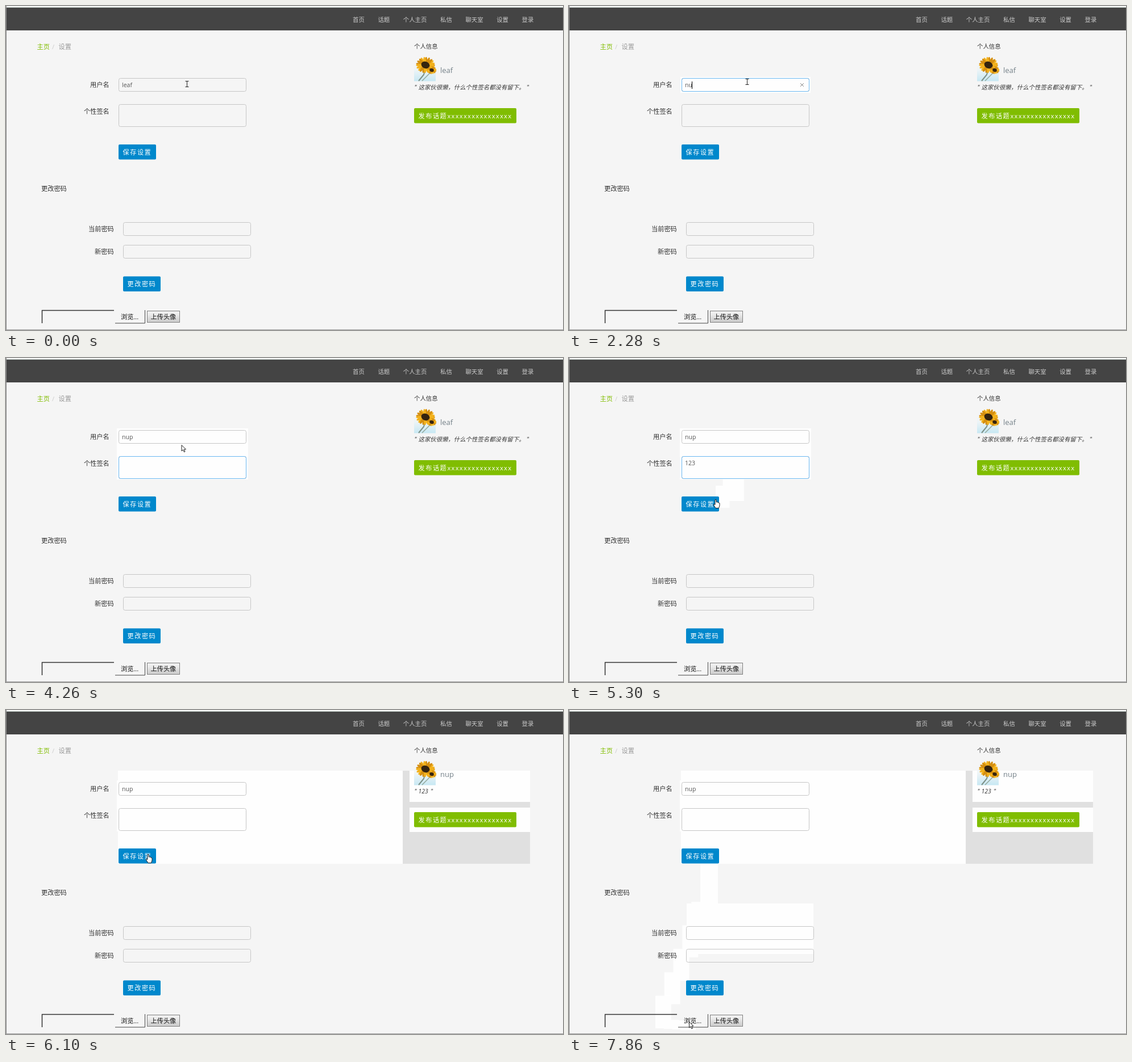
Recreate the animation shown at these times as an HTML page with a canvas. Size 980 px wide and 571 px high, loop 8000 ms.

```html
<!DOCTYPE html>
<html lang="zh-CN">
<head>
<meta charset="utf-8">
<title>设置</title>
<style>
html, body { margin: 0; width: 100%; height: 100%; overflow: hidden; background: #f5f5f5; }
canvas { display: block; width: 980px; height: 571px; }
</style>
</head>
<body>
<canvas id="stage" width="980" height="571"></canvas>
<script>
const ctx = document.getElementById('stage').getContext('2d');
const LOOP = 8000;
const FONT = '"Open Sans", "Noto Sans CJK SC", "Noto Sans CJK", "Noto Sans", sans-serif';
const OLD_NAME = 'leaf', NEW_NAME = 'nup', BIO = '123';
const WHITE = '#fefefe', INK = '#333', BLUE = '#0088cc', GREEN = '#80bd01';

// Moments of the story, in ms.
const FOCUS_NAME = 490, FOCUS_BIO = 3760, PRESS = 5600, SAVED = 6100, HOVER_PASSWORD = 7070;
const eraseKeys = [1250, 1570, 1750, 1900];
const nameKeys = [2280, 2280, 2510];
const bioKeys = [4350, 4500, 4750];

const box = (x, y, w, h) => ({ x, y, w, h });
const nameField = box(198, 127, 225, 24);
const bioField = box(198, 173, 225, 40);
const oldField = box(206, 381, 225, 24);
const newField = box(206, 421, 225, 24);
const saveButton = box(198, 244, 66, 26.5);
const fields = [nameField, bioField, oldField, newField];

// The pointer advances in even ticks along each straight move.
const START = { x: 318.5, y: 137.5 };
const moves = [
  { begin: -150, end: 270, ticks: 2, x: 313.5, y: 133.5 },
  { begin: 2990, end: 3200, ticks: 3, x: 308.5, y: 153 },
  { begin: 5030, end: 5300, ticks: 4, x: 258, y: 249, sweeps: true },
  { begin: 5300, end: 5460, ticks: 2, x: 250, y: 254 },
  { begin: 6860, end: 6930, ticks: 1, x: 231, y: 338, sweeps: true },
  { begin: 6975, end: 7450, ticks: 5, x: 152, y: 545, sweeps: true },
  { begin: 7553, end: 7860, ticks: 4, x: 211, y: 549, sweeps: true }
];

const clamp = (v, lo, hi) => Math.min(hi, Math.max(lo, v));
const ramp = (t, from, to) => clamp((t - from) / (to - from), 0, 1);
const mix = (a, b, p) => a + (b - a) * p;
const pressed = (keys, t) => keys.filter(k => k <= t).length;
const inside = (p, b) => p.x >= b.x && p.x <= b.x + b.w && p.y >= b.y && p.y <= b.y + b.h;

function pointerTrail(t) {
  const trail = [START];
  let from = START;
  for (const move of moves) {
    const done = clamp(Math.floor((t - move.begin) / (move.end - move.begin) * move.ticks + 1e-6), 0, move.ticks);
    for (let i = 1; i <= done; i++) {
      const p = i / move.ticks;
      trail.push({ x: mix(from.x, move.x, p), y: mix(from.y, move.y, p), sweeps: move.sweeps });
    }
    if (done < move.ticks) break;
    from = move;
  }
  return trail;
}

function caretAlpha(t, events) {
  const age = t - Math.max(...events.filter(e => e <= t));
  return 1 - ramp(age % 940, 400, 500);
}

function rect(x, y, w, h, color) {
  ctx.fillStyle = color;
  ctx.fillRect(x, y, w, h);
}

function text(str, x, y, size = 11.2, color = INK, spacing = 0, style = '') {
  ctx.font = `${style} ${size}px ${FONT}`;
  ctx.letterSpacing = spacing + 'px';
  ctx.fillStyle = color;
  ctx.fillText(str, x, y);
}

function line(points, color, width = 1) {
  ctx.beginPath();
  points.forEach(([x, y]) => ctx.lineTo(x, y));
  ctx.strokeStyle = color;
  ctx.lineWidth = width;
  ctx.stroke();
}

function gradient(top, bottom, ...colors) {
  const g = ctx.createLinearGradient(0, top, 0, bottom);
  colors.forEach((color, i) => g.addColorStop(i / (colors.length - 1), color));
  return g;
}

function drawField({ x, y, w, h }, focus = 0) {
  ctx.beginPath();
  ctx.roundRect(x + 0.5, y + 0.5, w - 1, h - 1, 3);
  ctx.lineWidth = 1;
  ctx.strokeStyle = '#c6c6c6';
  ctx.stroke();
  ctx.strokeStyle = `rgba(106,184,241,${focus})`;
  ctx.stroke();
}

function drawButton({ x, y, w, h }, label, color) {
  ctx.beginPath();
  ctx.roundRect(x, y, w, h, 2);
  ctx.fillStyle = color;
  ctx.fill();
  text(label, x + 7.5, y + 17.7, 11.2, '#fff', 1.5);
}

function typed(str, y, caret) {
  text(str, 204, y, 10.5, '#555');
  const x = Math.round(204 + ctx.measureText(str).width) - (str ? 1 : 0);
  rect(x, y - 10, 1, 13, `rgba(0,0,0,${caret})`);
}

function flower(x, y, r) {
  for (let i = 0; i < 22; i++) {
    const a = i * 2.4;
    ctx.beginPath();
    ctx.ellipse(x + Math.cos(a) * r * 0.65, y + Math.sin(a) * r * 0.5, r * 0.4, r * 0.14, a, 0, 7);
    ctx.fillStyle = i % 2 ? '#f3b21c' : '#d58f10';
    ctx.fill();
  }
  ctx.beginPath();
  ctx.ellipse(x, y, r * 0.48, r * 0.38, 0.4, 0, 7);
  ctx.fillStyle = '#35240f';
  ctx.fill();
}

function drawAvatar() {
  rect(718, 94, 38, 38.5, gradient(94, 132, 'rgba(245,245,245,0)', '#ecf4f7', '#c8e8f3'));
  line([[738, 110], [735, 121], [726, 132]], '#7d9187', 2);
  line([[748, 116], [741, 123], [732, 132]], '#93a99d', 1.5);
  flower(738, 104, 16);
  flower(749, 113, 8);
}

// Areas that are repainted brighter once they have been touched.
function drawRepaints(t, trail) {
  const { x, y, w, h } = nameField;
  if (t >= FOCUS_NAME) rect(x - 2, y - 2, w + 4, h + 4, WHITE);
  if (t >= FOCUS_BIO) rect(x - 3, y - 3, w + 6, bioField.y + bioField.h - y + 4, WHITE);
  if (t >= PRESS) rect(197, 213, 226, 58, WHITE);
  if (t >= SAVED) {
    rect(197, 107, 501, 164, WHITE);
    rect(698, 107, 224, 164, '#e0e0e0');
    rect(710, 107, 212, 55, WHITE);
    rect(710, 172, 212, 43, WHITE);
  }
  if (t >= HOVER_PASSWORD) rect(207, 341, 223, 89, WHITE);
  trail.forEach((p, i) => {
    if (!p.sweeps || p.y < 200) return;
    const last = trail[i - 1];
    rect(Math.min(p.x, last.x), Math.max(213, last.y), Math.abs(p.x - last.x) + 12, p.y - last.y + 15, WHITE);
  });
}

function drawHeader() {
  rect(0, 2, 980, 1, '#b9c4bf');
  rect(0, 3, 980, 40, '#444');
  let x = 610;
  for (const label of ['首页', '话题', '个人主页', '私信', '聊天室', '设置', '登录']) {
    text(label, x, 27.5, 10.4, '#ccc');
    x += label.length * 10.4 + 23.6;
  }
  text('主页', 54.5, 76, 11.2, GREEN);
  text('/', 81, 76, 11.2, '#ccc');
  text('设置', 92.5, 76, 11.2, '#999');
}

function drawProfileForm(t) {
  const erased = pressed(eraseKeys, t), added = pressed(nameKeys, t);
  const name = added ? NEW_NAME.slice(0, added) : OLD_NAME.slice(0, OLD_NAME.length - erased);
  const bio = t < SAVED ? BIO.slice(0, pressed(bioKeys, t)) : '';
  const inName = t >= FOCUS_NAME && t < FOCUS_BIO;
  const inBio = t >= FOCUS_BIO && t < PRESS;

  text('用户名', 148, 143);
  drawField(nameField, inName ? ramp(t, FOCUS_NAME - 90, 670) : 0);
  typed(name, 143, inName ? caretAlpha(t, [FOCUS_NAME, ...eraseKeys, ...nameKeys]) : 0);
  if (inName && name) {
    line([[407, 136], [413, 142]], '#888');
    line([[413, 136], [407, 142]], '#888');
  }

  text('个性签名', 137, 190);
  drawField(bioField, inBio ? ramp(t, FOCUS_BIO - 80, 3840) : 0);
  typed(bio, 189, inBio ? caretAlpha(t, [FOCUS_BIO, ...bioKeys]) : 0);

  const heat = t < SAVED ? ramp(t, 5300, PRESS) : 0;
  drawButton(saveButton, '保存设置', `rgb(0,${136 - 52 * heat},204)`);
}

function drawPasswordForm() {
  text('更改密码', 62, 326.3);
  text('当前密码', 145, 397.3);
  drawField(oldField);
  text('新密码', 156, 437.3);
  drawField(newField);
  drawButton(box(206, 476.5, 66, 26.5), '更改密码', BLUE);
}

function drawUpload() {
  line([[63.5, 559], [63.5, 536.5], [190, 536.5]], INK, 1.5);
  line([[192, 559], [244.5, 559], [244.5, 536]], '#444');
  text('浏览...', 202, 552.3, 11.2, '#111');
  rect(248, 537, 58, 21, gradient(537, 558, '#f2f2f2', '#ebebeb', '#d8d8d8', '#cacaca'));
  ctx.strokeStyle = '#808080';
  ctx.lineWidth = 1;
  ctx.strokeRect(248.5, 537.5, 57, 20);
  text('上传头像', 254.5, 551.7, 11.2, '#111');
}

function drawSidebar(t) {
  const saved = t >= SAVED;
  const italic = (str, x) => text(str, x, 147, 10.4, INK, 0, 'italic');
  text('个人信息', 718, 75.3, 10.4);
  drawAvatar();
  text(saved ? NEW_NAME : OLD_NAME, 764, 117.5, 13, '#748088');
  italic('"', 718.5);
  italic(saved ? BIO : '这家伙很懒，什么个性签名都没有留下。', 725.5);
  italic('"', saved ? 747 : 916);
  drawButton(box(718, 180, 180, 26.5), '发布话题', GREEN);
  text('x'.repeat(16), 776.5, 197.7, 11.2, '#fff', 1.25);
}

function outline(points) {
  ctx.beginPath();
  points.forEach(([x, y]) => ctx.lineTo(x, y));
  ctx.closePath();
  ctx.fillStyle = '#fff';
  ctx.fill();
  ctx.strokeStyle = '#222';
  ctx.lineWidth = 1;
  ctx.stroke();
}

const cursors = {
  beam() {
    line([[0, -5], [0, 5]], '#222');
    for (const y of [-5, 5]) line([[-3, y], [3, y]], '#222');
  },
  arrow() {
    outline([[0.5, 0.5], [0.5, 11], [3, 8.7], [4.8, 12.7], [6.5, 12], [4.8, 8], [8, 8]]);
  },
  hand() {
    outline([[-1, 1], [0, 0], [1, 1], [1.3, 5], [3.5, 5], [7, 7], [7, 11], [5.5, 15.5],
      [0, 15.5], [-3.5, 10], [-3.3, 8.5], [-1, 9.5]]);
  }
};

function drawPointer(p) {
  const kind = inside(p, saveButton) ? 'hand' : fields.some(f => inside(p, f)) ? 'beam' : 'arrow';
  ctx.save();
  ctx.translate(p.x, p.y);
  cursors[kind]();
  ctx.restore();
}

function draw(t) {
  const trail = pointerTrail(t);
  rect(0, 0, 980, 571, '#f5f5f5');
  drawRepaints(t, trail);
  drawHeader();
  drawProfileForm(t);
  drawPasswordForm();
  drawUpload();
  drawSidebar(t);
  rect(0, 0, 1, 571, '#888');
  rect(0, 570, 980, 1, '#999');
  drawPointer(trail[trail.length - 1]);
}

const start = performance.now();
function frame() {
  draw((performance.now() - start) % LOOP);
  requestAnimationFrame(frame);
}
frame();
</script>
</body>
</html>
```
